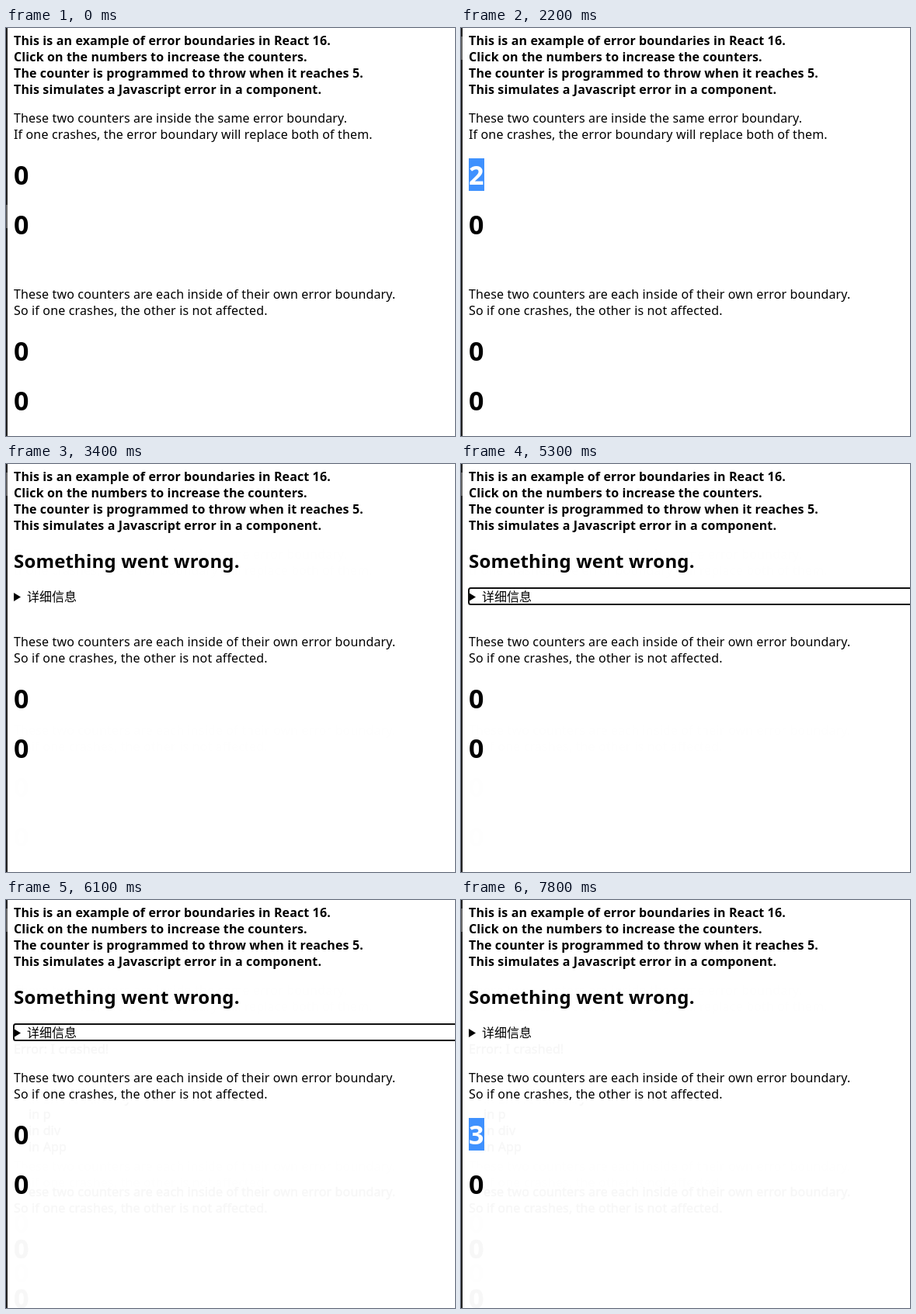
These frames come from a looping animation (578x526 px, 8000 ms). An HTML page:

```html
<!DOCTYPE html>
<html lang="en">
<head>
<meta charset="utf-8">
<style>
html, body { margin: 0; width: 100%; height: 100%; overflow: hidden; background: #fff; }
svg { display: block; }
text { font: 16px "Noto Sans", "Open Sans", sans-serif; letter-spacing: .15px; white-space: pre; }
.bold { font-weight: 700; letter-spacing: .12px; }
.title { font-weight: 700; font-size: 24px; letter-spacing: .16px; }
.num { font-weight: 700; font-size: 34px; letter-spacing: 0; }
.cjk { font-family: "Noto Sans CJK SC", "Noto Sans CJK", sans-serif; letter-spacing: 0; }
.ghost { fill: #f7f7f7; stroke: #f7f7f7; stroke-width: .5px; }
</style>
</head>
<body>
<svg id="stage" width="578" height="526" viewBox="0 0 578 526"></svg>
<script>
const LOOP = 8000, LINE = 21;
const stage = document.getElementById("stage");

const intro = [
  "This is an example of error boundaries in React 16.",
  "Click on the numbers to increase the counters.",
  "The counter is programmed to throw when it reaches 5.",
  "This simulates a Javascript error in a component."
];
const shared = [
  "These two counters are inside the same error boundary.",
  "If one crashes, the error boundary will replace both of them."
];
const separate = [
  "These two counters are each inside of their own error boundary.",
  "So if one crashes, the other is not affected."
];
const stack = ["Error: I crashed!", "",
  ...["BuggyCounter", "ErrorBoundary", "p", "div", "App"].map(n => "in " + n)];

const text = (s, x, y, cls = "") => `<text x="${x}" y="${y}" class="${cls}">${s}</text>`;
const rect = (x, y, w, h, fill) => `<rect x="${x}" y="${y}" width="${w}" height="${h}" fill="${fill}"/>`;
const lines = (list, y, cls) => list.map((s, i) => text(s, 10, y + i * LINE, cls)).join("");

function counter(n, y, selected) {
  const digit = text(n, 10, y, "num");
  return selected ? rect(10, y - 34, 20, 42, "#3f91fe") + `<g fill="#fff">${digit}</g>` : digit;
}

const stackTrace = () => stack.map((s, i) => text(s, i ? 29 : 10, 198 + i * LINE)).join("");

// The block with its own boundaries, pushed down by dy
const lower = (dy, n = 0, selected = false) =>
  lines(separate, 235 + dy) + counter(n, 315 + dy, selected) + counter(0, 379 + dy);

function beforeCrash(t) {
  const n = [1400, 1900, 2300, 2800].filter(c => t >= c).length;
  return lines(shared, 122) + counter(n, 202, t >= 2200 && t < 2700) + counter(0, 266) + lower(114);
}

function afterCrash(t) {
  const open = t >= 5400 && t < 6100;
  const dy = open ? stack.length * LINE : 0;
  const n = [7000, 7400, 7800].filter(c => t >= c).length;
  let out = `<g fill="#fefefe">${lines(shared, 122) + lower(114)}</g>`;
  if (open) out = stackTrace();
  if (t >= 6100) {
    // Faint remains of the opened details, wiped where new content was painted
    out += `<g class="ghost">${stackTrace() + lower(stack.length * LINE)}</g>` +
      rect(10, 219, 491, 42, "#fff") + rect(10, 281, 19, 42, "#fff") + rect(10, 345, 19, 42, "#fff");
  }
  out += text("Something went wrong.", 10, 134, "title");
  out += `<path d="${open ? "M10 167H20L15 176Z" : "M10 166V177L19 171.5Z"}"/>`;
  out += text("详细信息", 27, 177, "cjk");
  if (t >= 5300 && t < 6900)
    out += '<rect x="10" y="160" width="600" height="21" rx="2.5" fill="none" stroke="#101010" stroke-width="2"/>';
  return out + lower(dy, n, t >= 7400);
}

function scene(t) {
  return rect(0, 0, 2, 526, "#222") + rect(0, t < 1300 ? 228 : 11, 2, 30, "#666") +
    lines(intro, 22, "bold") + (t < 3400 ? beforeCrash(t) : afterCrash(t));
}

let shown;
function frame() {
  const next = scene(performance.now() % LOOP);
  if (next !== shown) stage.innerHTML = shown = next;
  requestAnimationFrame(frame);
}
frame();
</script>
</body>
</html>
```
